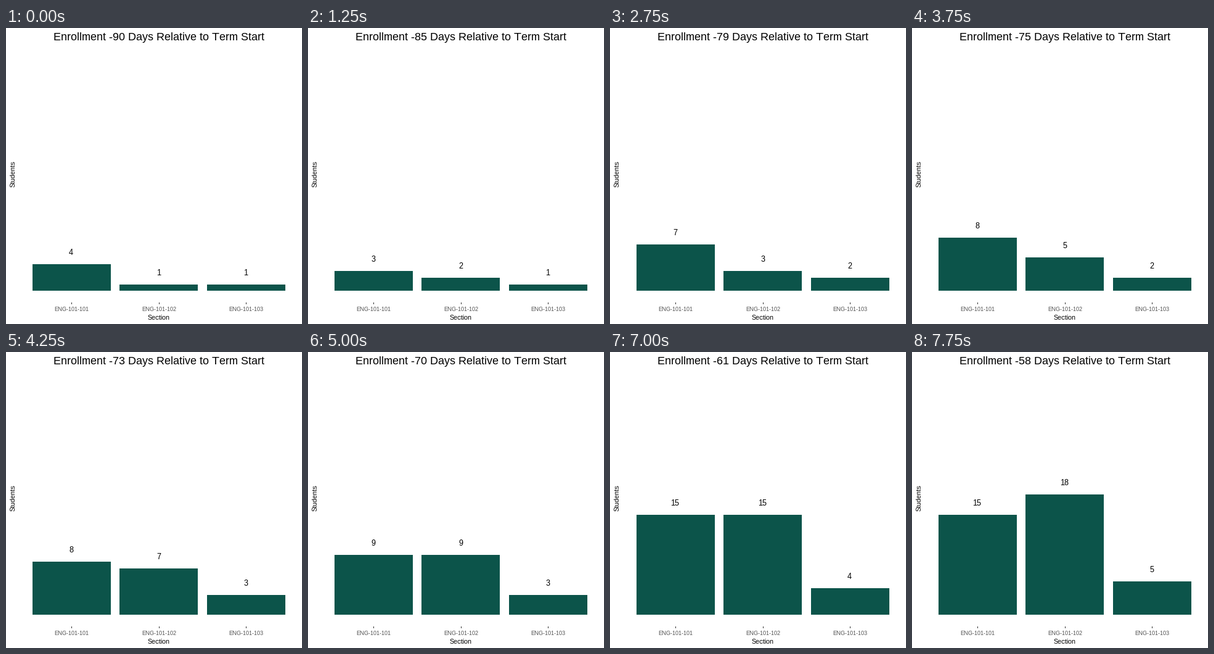
These frames come from a looping animation (480 by 480 pixels, 8000 ms). A matplotlib script:

```python
import numpy as np
import matplotlib.pyplot as plt
from matplotlib.animation import FuncAnimation
from matplotlib.patches import Rectangle

SIZE = 480
FRAMES, INTERVAL = 32, 250
BASE, UNIT = 426.4, 10.83
BAR_WIDTH, PITCH = 127, 141.5
GREEN, TICK, GREY = "#0c544a", "#333333", "#4d4d4d"

# whole-pixel hinting and no kerning, for crisp screen text
plt.rcParams.update({
    "font.family": "Liberation Sans",
    "text.hinting": "native",
    "text.hinting_factor": 1,
    "text.kerning_factor": 6,
})

# (frame, students) turning points; enrollment is linear in between
TRENDS = [
    [(0, 4), (5, 3), (12, 8), (17, 8), (28, 15)],
    [(0, 1), (10, 3), (17, 7), (28, 15), (31, 18)],
    [(0, 1), (25, 4), (29, 5)],
]

fig = plt.figure(figsize=(SIZE / 72, SIZE / 72), dpi=72, facecolor="white")
ax = fig.add_axes([0, 0, 1, 1])
ax.set_xlim(0, SIZE)
ax.set_ylim(SIZE, 0)
ax.axis("off")


def label(x, y, text, size, color="black", **kw):
    return ax.text(x, y, text, fontsize=size, color=color,
                   ha="center", va="baseline", **kw)


def box(x, y, w, h, color):
    return ax.add_patch(Rectangle((x, y), w, h, facecolor=color,
                                  linewidth=0, antialiased=False))


def students(trend, i):
    at, count = zip(*trend)
    return int(np.interp(i, at, count) + 1e-6)


title = label(248, 20, "", 18)
label(248, 473, "Section", 11)
label(15, 237, "Students", 11, rotation=90, rotation_mode="anchor")

bars, counts = [], []
for k in range(len(TRENDS)):
    centre = round(106 + PITCH * k)
    box(centre, 445, 1, 3, TICK)
    label(centre, 459, f"ENG-101-{101 + k}", 9, GREY)
    bars.append(box(int(43 + PITCH * k), 426, BAR_WIDTH, 0, GREEN))
    counts.append(label(centre - 0.4, 0, "", 13))


def draw(i):
    day = round(i * 1.025) - 90
    title.set_text(f"Enrollment {day} Days Relative to Term Start")
    for trend, bar, count in zip(TRENDS, bars, counts):
        n = students(trend, i)
        top = round(BASE - UNIT * n)
        bar.set_y(top)
        bar.set_height(426 - top)
        count.set_text(str(n))
        count.set_y(top - 15)
    return [title, *bars, *counts]


anim = FuncAnimation(fig, draw, frames=FRAMES, interval=INTERVAL,
                     repeat=True, repeat_delay=0, blit=False)
plt.show()
```
